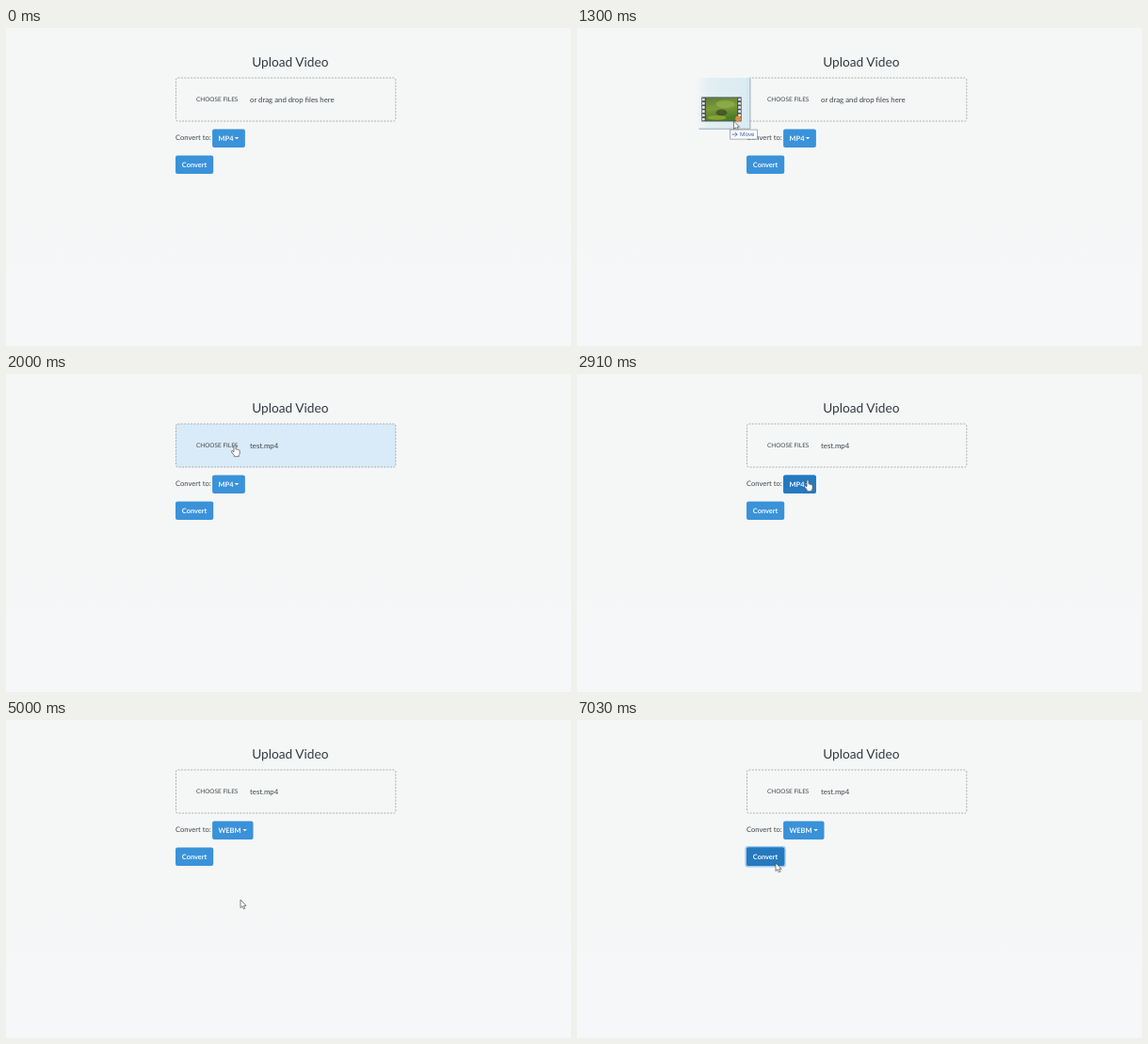
An HTML page that plays this animation: 600 by 338 pixels, repeating every 7.3 s.

```html
<!DOCTYPE html>
<html lang="en">
<head>
<meta charset="utf-8">
<title>Upload Video</title>
<style>
  html, body { margin: 0; width: 100%; height: 100%; overflow: hidden; background: #f5f7f7; }
  svg { display: block; width: 100vw; height: 100vh; }
  text { font: 7.8px Lato, "Open Sans", sans-serif; fill: #3f4448; text-rendering: geometricPrecision; }
  .title { font-size: 13.7px; fill: #343a3f; }
  .small { font-size: 6.45px; }
  .label { font-size: 7.6px; }
  .btn text { font-size: 7.45px; font-weight: 700; fill: #f4f9fd; }
  .base { fill: #3a92d9; }
  .dark { fill: #2579bf; }
  .ring { fill: #9fc9ec; }
  .tip text { font: 6px "Open Sans", sans-serif; fill: #2f4f9c; }
  .cursor { fill: #fff; stroke: #4a4a4a; stroke-width: .7; stroke-linejoin: round; }
</style>
</head>
<body>
<svg viewBox="0 0 600 338">
  <defs>
    <linearGradient id="page" x2="0" y2="1">
      <stop offset=".6" stop-color="#f5f7f7"/><stop offset="1" stop-color="#f5f7f9"/>
    </linearGradient>
    <linearGradient id="glass">
      <stop offset="0" stop-color="#d3e8f1" stop-opacity="0"/>
      <stop offset=".25" stop-color="#d3e8f1" stop-opacity=".55"/>
      <stop offset="1" stop-color="#d3e8f1" stop-opacity=".8"/>
    </linearGradient>
    <linearGradient id="photo" x2=".2" y2="1">
      <stop offset="0" stop-color="#5d7f35"/><stop offset=".5" stop-color="#7d9c3a"/>
      <stop offset="1" stop-color="#4c7a26"/>
    </linearGradient>
  </defs>
  <rect width="600" height="338" fill="url(#page)"/>
  <text class="title" x="301.8" y="41.3" text-anchor="middle">Upload Video</text>

  <rect id="zone" x="180.5" y="53" width="233.3" height="46" rx="2" fill="#d9eaf9"/>
  <rect x="180.5" y="53" width="233.3" height="46" rx="2" fill="none" stroke="#9a9e9f" stroke-width=".8" stroke-dasharray="2 1.4"/>
  <text class="small" x="202" y="78.4">CHOOSE FILES</text>
  <text id="file" x="259" y="79"></text>
  <text class="label" x="180" y="119">Convert to:</text>

  <g class="btn" id="convert">
    <rect class="ring" x="178.4" y="133.9" width="43.4" height="22.6" rx="3"/>
    <rect class="base" x="180" y="135.5" width="40.2" height="19.4" rx="2"/>
    <rect class="dark" x="180" y="135.5" width="40.2" height="19.4" rx="2"/>
    <text x="200.1" y="147.8" text-anchor="middle">Convert</text>
  </g>
  <g class="btn" id="format">
    <rect class="ring" x="217.5" y="105.9" height="22.8" rx="3"/>
    <rect class="base" x="219.1" y="107.5" height="19.6" rx="2"/>
    <rect class="dark" x="219.1" y="107.5" height="19.6" rx="2"/>
    <text x="225.5" y="120"></text>
    <path d="M0 0h4.6l-2.3 2.3z" fill="#f4f9fd"/>
  </g>

  <g id="menu">
    <rect x="219.4" y="128" width="82.4" height="137.6" rx="2" fill="#fdfefe" stroke="#d3d7d9" stroke-width=".7"/>
    <rect id="row" x="219.7" width="81.8" height="16.1"/>
    <g id="items"></g>
  </g>

  <g id="pointer">
    <g id="ghost">
      <rect x="-41" y="-46" width="58" height="54" fill="url(#glass)"/>
      <path d="M17.4-45V8.3H-37" fill="none" stroke="#8c9fac" stroke-width=".9"/>
      <rect x="-34.2" y="-25.5" width="42.4" height="26" fill="#4a4d50"/>
      <path d="M-32.1-24.2V0M6.1-24.2V0" stroke="#e9edee" stroke-width="2.6" stroke-dasharray="2.6 1.6"/>
      <rect x="-29.4" y="-24.7" width="33" height="24.4" fill="url(#photo)"/>
      <ellipse cx="-9" cy="-18" rx="10" ry="4" fill="#9bb552" opacity=".6"/>
      <ellipse cx="-13" cy="-9" rx="6" ry="3.5" fill="#3c4a20" opacity=".75"/>
      <ellipse cx="-18" cy="-3.6" rx="10" ry="2.4" fill="#a5bd3f" opacity=".6"/>
      <circle cx="4.6" cy="-2.6" r="2.9" fill="#e88a3c"/>
    </g>
    <path class="cursor" id="arrow" d="M0 0V8.6L2 6.8 3.4 9.9 4.8 9.3 3.5 6.3H6.1Z"/>
    <path class="cursor" id="hand" d="M-1 .8Q-1-.3 0-.3T1 .8V4.1Q1.9 3.4 2.6 4.4 3.5 3.9 4 4.8 5.2 4.5 5.2 5.7V8.2Q5.1 9.6 4.3 10.4V11.7H-.7V10.6L-3.5 6.8Q-3.9 5.8-2.9 5.6-2 5.7-1 6.9Z"/>
    <path id="beam" d="M-1.8-5H1.8M0-5V5M-1.8 5H1.8" fill="none" stroke="#444" stroke-width=".8"/>
    <g class="tip" id="tip">
      <rect x="-4" y="9.2" width="29" height="10" fill="#fcfdfe" stroke="#8a8f96" stroke-width=".7"/>
      <path d="M-2 14.2H3.6M1.3 11.8 3.7 14.2 1.3 16.6" fill="none" stroke="#3566b8" stroke-width=".8"/>
      <text x="6.6" y="16.3">Move</text>
    </g>
  </g>
</svg>
<script>
const LOOP = 7300, ROW = 16.1, TOP = 132.9;
const DROP = 2000, OPEN = 3000, PRESS = 4480, PICK = 4600, SUBMIT = 6180;
const $ = id => document.getElementById(id);

// time, x, y of the pointer's hot spot
const path = [
  [1060, 4, 119], [1180, 92, 112], [1300, 166, 99], [1460, 222, 83], [1700, 243, 76],
  [2520, 243, 76], [2860, 245, 113], [3550, 245, 113], [3910, 251, 179.5], [4030, 249, 191],
  [5390, 249, 191], [6000, 204, 147], [SUBMIT, 204, 147], [6560, 323, 38], [6790, 323, 38],
  [7030, 211, 152], [LOOP, 211, 152]
];
const shapes = [
  [0, ""], [1060, "arrow"], [DROP, "hand"], [2640, "arrow"], [2740, "hand"], [PICK, "arrow"],
  [5850, "hand"], [6250, "arrow"], [6520, "beam"], [6840, "arrow"]
];

["MP4", "FLV", "AVI", "WEBM", "WMV", "MOV", "MKV", "MPEG-2"].forEach((name, i) => {
  const el = document.createElementNS("http://www.w3.org/2000/svg", "text");
  el.setAttribute("x", 232);
  el.setAttribute("y", TOP + ROW * i + 10.8);
  el.textContent = name;
  $("items").append(el);
});

const clamp = v => Math.max(0, Math.min(1, v));
// fades in from a and out from b
const fade = (t, a, b, d = 150) => clamp((t - a) / d) * (1 - clamp((t - b) / d));
const show = (el, on) => el.setAttribute("opacity", +on);
const still = (a, b) => a[1] === b[1] && a[2] === b[2];

function slope(i, k) {
  const p = path[i - 1], c = path[i], n = path[i + 1];
  if (!n) return 0;
  if (!p) return (n[k] - c[k]) / (n[0] - c[0]);
  return still(p, c) || still(c, n) ? 0 : (n[k] - p[k]) / (n[0] - p[0]);
}

function position(t) {
  if (t <= path[0][0]) return path[0].slice(1);
  const i = path.findIndex(p => p[0] > t) - 1, a = path[i], b = path[i + 1];
  const d = b[0] - a[0], u = (t - a[0]) / d, s = u * u * (3 - 2 * u);
  return [1, 2].map(k => a[k] + (b[k] - a[k]) * s
    + d * u * (1 - u) * ((1 - u) * slope(i, k) - u * slope(i + 1, k)));
}

function paintButton(id, dark, ring) {
  show($(id).querySelector(".dark"), dark);
  show($(id).querySelector(".ring"), ring);
}

function setFormat(name, width) {
  const g = $("format");
  g.querySelectorAll("rect").forEach(r =>
    r.setAttribute("width", r.matches(".ring") ? width + 3.2 : width));
  g.querySelector("text").textContent = name;
  g.querySelector("path").setAttribute("transform", `translate(${219.1 + width - 11.2} 116)`);
}

function paintMenu(t, x, y) {
  const row = Math.floor((y - TOP) / ROW), over = row >= 0 && x > 219;
  const pressed = t >= PRESS;
  show($("menu"), t >= OPEN && t < PICK);
  show($("row"), over);
  $("row").setAttribute("y", TOP + ROW * Math.max(0, row));
  $("row").setAttribute("fill", pressed ? "#3a92d9" : "#e5e9eb");
  [...$("items").children].forEach((el, i) =>
    el.style.fill = pressed && over && i === row ? "#fff" : "");
}

function paint(t) {
  const [x, y] = position(t);
  const shape = shapes.filter(s => s[0] <= t).pop()[1];
  const drag = t >= 1060 && t < DROP;

  $("pointer").setAttribute("transform", `translate(${x.toFixed(2)} ${y.toFixed(2)})`);
  for (const id of ["arrow", "hand", "beam"]) show($(id), id === shape);
  show($("ghost"), drag);
  show($("tip"), drag);

  show($("zone"), t >= 1345 ? 1 - clamp((t - 2030) / 80) : 0);
  $("file").textContent = t < DROP ? "or drag and drop files here" : "test.mp4";

  if (t < PICK) setFormat("MP4", 34.8); else setFormat("WEBM", 43.4);
  paintButton("format", fade(t, 2740, PICK), fade(t, OPEN - 60, PICK));
  paintButton("convert", fade(t, 5850, 6290) + fade(t, 6880, LOOP), fade(t, SUBMIT, LOOP));
  paintMenu(t, x, y);
}

const start = performance.now();
function tick() {
  paint((performance.now() - start) % LOOP);
  requestAnimationFrame(tick);
}
tick();
</script>
</body>
</html>
```
